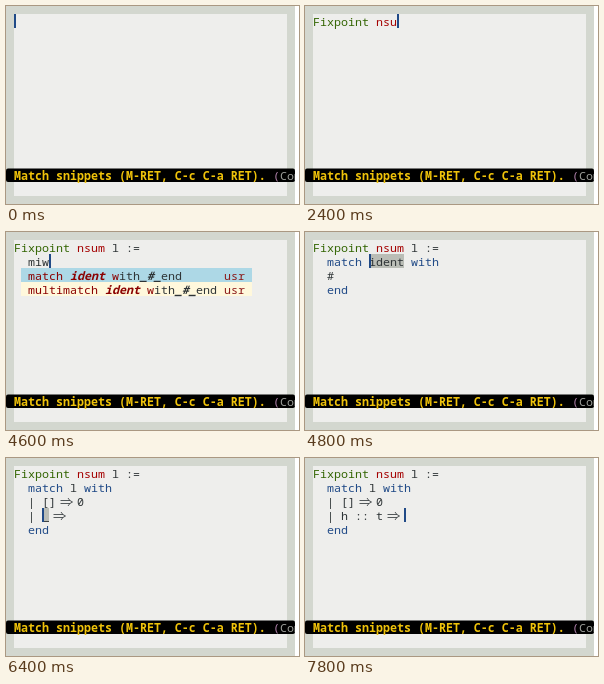
Write an HTML page that moves like this. It is 293 px wide and 198 px high and loops after 8 s.

```html
<!DOCTYPE html>
<html lang="en">
<head>
<meta charset="utf-8">
<style>
  html, body { margin: 0; width: 100%; height: 100%; overflow: hidden; background: #fff; }
  svg { display: block; }
  text { font: 11.667px "Noto Sans Mono", "DejaVu Sans Mono", monospace; white-space: pre; }
  .bold { font-weight: bold; }
  .slot { font-weight: bold; font-style: italic; }
</style>
</head>
<body>
<svg id="stage" width="293" height="198">
  <clipPath id="window"><rect width="289" height="198"/></clipPath>
  <g clip-path="url(#window)">
    <rect width="289" height="198" fill="#d3d7cf"/>
    <rect x="8" y="8" width="273" height="182" fill="#eeeeec"/>
    <g id="editor"></g>
    <rect y="162.5" width="289" height="13.5" rx="2" fill="#000"/>
    <text class="bold" x="8" y="174" fill="#f0c30a">Match snippets (M-RET, C-c C-a RET).</text>
    <text x="267" y="174" fill="#ad7fa8">(<tspan fill="#9a9c97">Com</tspan></text>
  </g>
</svg>
<script>
const STEP = 200, LOOP = 8000, CELL = 7, LINE = 14, LEFT = 8, TOP = 8;
const INK = '#2e3436', GREEN = '#346604', RED = '#a40000', BLUE = '#204a87', DARK_RED = '#8b0000';
const KEYWORDS = ['match', 'with', 'end'];
const editor = document.getElementById('editor');

// Editing session: every call to snap() records one step of the screen.
const steps = [];
let lines = [''], row = 0, col = 0, hole = 0, popup = false;

function snap() {
  steps.push({ lines: [...lines], row, col, hole, popup });
}
function type(text) {
  for (const ch of text) {
    const line = lines[row];
    lines[row] = line.slice(0, col) + ch + line.slice(col + hole);
    hole = 0;
    col++;
    snap();
  }
}
function go(newRow, newCol, holeWidth = 0) {
  row = newRow; col = newCol; hole = holeWidth;
  snap();
}

snap();
type('Fixpoint nsum l :=');
lines.push('  ');
go(1, 2);
type('miw');
popup = true;
snap();
popup = false;
lines.splice(1, 1, '  match ident with', '  #', '  end');
go(1, 8, 5);
type('l');
go(2, 2, 1);
lines[2] = '  | _ ⇒ ';
go(2, 4, 1);
type('[]');
go(2, 9);
type('0');
lines.splice(3, 0, '  | _ ⇒ ');
go(3, 4, 1);
type('h :: t');
go(3, 13);

const px = c => LEFT + c * CELL;
const py = r => TOP + r * LINE;

function add(tag, attrs, content = '') {
  const node = document.createElementNS('http://www.w3.org/2000/svg', tag);
  for (const key in attrs) node.setAttribute(key, attrs[key]);
  node.textContent = content;
  editor.append(node);
}
function box(c, r, width, fill) {
  add('rect', { x: px(c), y: py(r), width, height: LINE, fill });
}
function write(c, r, content, fill = INK, cls = '') {
  add('text', { x: px(c), y: py(r) + 12, fill, class: cls }, content);
}
function arrow(c, r) {
  const x = px(c) - 3, y = py(r) + 8;
  add('path', {
    d: `M${x + .5} ${y - 1.5}h9.5M${x + .5} ${y + 1.5}h9.5M${x + 8} ${y - 4}q1.5 3 4.5 4q-3 1-4.5 4`,
    fill: 'none', stroke: INK, 'stroke-width': .8
  });
}
function drawLine(line, r) {
  let previous = '';
  for (const { 0: word, index } of line.matchAll(/⇒|[^\s⇒]+/g)) {
    if (word === '⇒') arrow(index, r);
    else write(index, r, word,
      word === 'Fixpoint' ? GREEN :
      previous === 'Fixpoint' ? RED :
      KEYWORDS.includes(word) ? BLUE : INK);
    previous = word;
  }
}
function drawCandidate(name, r, fill) {
  box(1, r, 33 * CELL, fill);
  let c = 2;
  const parts = [[name + ' ', DARK_RED], ['ident', DARK_RED, 'slot'], [' w', DARK_RED],
    ['ith', INK], ['_#_', INK, 'slot'], ['end', INK]];
  for (const [word, color, cls] of parts) {
    write(c, r, word, color, cls);
    c += word.length;
  }
  write(30, r, 'usr', '#8b1a1a');
}
function draw(s) {
  editor.replaceChildren();
  if (s.hole) box(s.col, s.row, s.hole * CELL, '#babdb6');
  s.lines.forEach(drawLine);
  if (s.popup) {
    drawCandidate('match', 2, '#add8e6');
    drawCandidate('multimatch', 3, '#fff8dc');
  }
  box(s.col, s.row, 2, BLUE);
}

const start = performance.now();
let shown = -1;
function tick() {
  const time = Math.max(0, performance.now() - start) % LOOP;
  const index = Math.min(Math.floor(time / STEP), steps.length - 1);
  if (index !== shown) draw(steps[shown = index]);
  requestAnimationFrame(tick);
}
tick();
</script>
</body>
</html>
```
